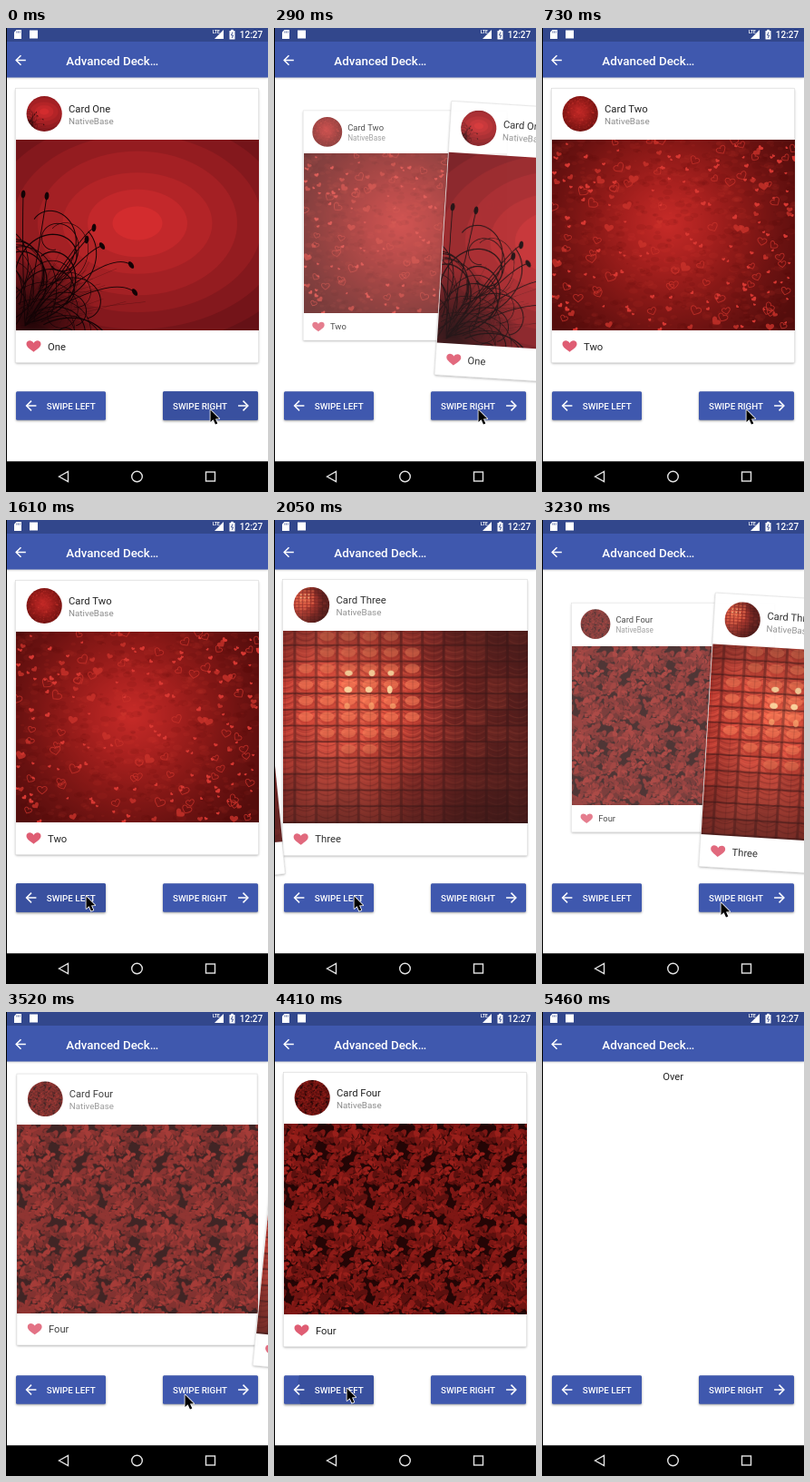
Animation of 289x511 px, one loop 6350 ms. Source, as an HTML page with a canvas:

```html
<!DOCTYPE html>
<html lang="en">
<head>
<meta charset="utf-8">
<title>Deck swiper</title>
<style>
html, body { margin: 0; width: 100%; height: 100%; overflow: hidden; background: #fff; }
canvas { display: block; width: 289px; height: 511px; }
</style>
</head>
<body>
<canvas id="stage"></canvas>
<script>
const W = 289, H = 511, LOOP = 6350;
const CARD = { x: 10.5, y: 66.5, w: 268, h: 302, cx: 144.5, cy: 217.5 };
const ART_W = 268, ART_H = 210, TAU = Math.PI * 2;
const BLUE = '#3f58ae';

const ratio = Math.max(1, window.devicePixelRatio || 1);
const stage = document.getElementById('stage');
stage.width = W * ratio;
stage.height = H * ratio;
const c = stage.getContext('2d');
c.imageSmoothingQuality = 'high';

function seeded(seed) {
  return () => {
    seed = (seed * 1664525 + 1013904223) >>> 0;
    return seed / 4294967296;
  };
}

function ellipse(g, x, y, rx, ry, fill, turn = 0) {
  g.fillStyle = fill;
  g.beginPath();
  g.ellipse(x, y, rx, ry, turn, 0, TAU);
  g.fill();
}

function box(g, x, y, w, h, fill, r = 0) {
  g.fillStyle = fill;
  g.beginPath();
  g.roundRect(x, y, w, h, r);
  g.fill();
}

function line(g, points, color, width, close) {
  g.strokeStyle = color;
  g.lineWidth = width;
  g.beginPath();
  points.forEach(([x, y]) => g.lineTo(x, y));
  if (close) g.closePath();
  g.stroke();
}

function blend(gradient, ...colors) {
  colors.forEach((color, i) => gradient.addColorStop(i / (colors.length - 1), color));
  return gradient;
}

function heartPath(g, w) {
  const u = w / 16;
  g.beginPath();
  g.moveTo(0, 6.3 * u);
  g.bezierCurveTo(-4 * u, 3.2 * u, -8 * u, 1 * u, -8 * u, -2.4 * u);
  g.bezierCurveTo(-8 * u, -7 * u, -2 * u, -7.4 * u, 0, -3.6 * u);
  g.bezierCurveTo(2 * u, -7.4 * u, 8 * u, -7 * u, 8 * u, -2.4 * u);
  g.bezierCurveTo(8 * u, 1 * u, 4 * u, 3.2 * u, 0, 6.3 * u);
  g.closePath();
}

function makeArt(paint) {
  const art = document.createElement('canvas');
  art.width = ART_W * 2;
  art.height = ART_H * 2;
  const g = art.getContext('2d');
  g.scale(2, 2);
  paint(g);
  return art;
}

// Concentric red bands with black flourishes growing from the lower left.
function paintSwirls(g) {
  const rnd = seeded(11), ink = '#130305';
  box(g, 0, 0, ART_W, ART_H, '#651116');
  for (let i = 7; i >= 1; i--) {
    const k = (7 - i) / 6;
    const shade = `rgb(${116 + 95 * k},${20 + 24 * k},${25 + 21 * k})`;
    ellipse(g, 134, 92, 27.5 * i, 18.6 * i + (i > 3 ? 5 : 0), shade);
  }
  g.lineCap = 'round';
  for (let i = 0; i < 30; i++) {
    let x = rnd() * 50 - 8, y = 205 - rnd() * 45, a = -0.1 - rnd() * 1.7;
    const side = rnd() < 0.5 ? -1 : 1, bend = 0.02 + rnd() * 0.03;
    const n = 55 + rnd() * 45, points = [];
    for (let s = 0; s < n; s++) {
      points.push([x, y]);
      x += Math.cos(a) * 1.7;
      y += Math.sin(a) * 1.7;
      a += side * bend * (1 + (s / 45) ** 2);
    }
    line(g, points, ink, 0.5 + rnd() * 0.9);
  }
  const buds = [[86, 97], [78, 110], [95, 117], [127, 138], [131, 168], [34, 62], [8, 60]];
  for (const [x, y] of buds) {
    g.strokeStyle = ink;
    g.lineWidth = 0.9;
    g.beginPath();
    g.moveTo(10, 205);
    g.quadraticCurveTo(x * 0.8, y + 70 - x * 0.7, x, y);
    g.stroke();
    ellipse(g, x, y, 2.4, 4.4, ink, x > 90 ? -0.6 : 0.1);
  }
  for (let i = 0; i < 30; i++) {
    const a = -rnd() * 1.5, r = 40 + rnd() * 60;
    const x = rnd() * 60, y = 205 - rnd() * 40;
    line(g, [[x, y], [x + Math.cos(a) * r, y + Math.sin(a) * r * 0.6]], ink + '55', 0.5);
  }
  box(g, 0, 0, ART_W, ART_H,
    blend(g.createRadialGradient(18, 196, 4, 18, 196, 70), ink + 'cc', ink + '00'));
}

function paintHearts(g) {
  const rnd = seeded(29);
  box(g, 0, 0, ART_W, ART_H, blend(g.createRadialGradient(128, 92, 5, 128, 92, 165),
    '#c42a27', '#a9211f', '#8a1917', '#6b1211', '#540d0c'));
  for (let i = 0; i < 900; i++) {
    const size = 1 + rnd() * 5;
    ellipse(g, rnd() * ART_W, rnd() * ART_H, size, size * 0.6, rnd() < 0.5 ? '#3d060614' : '#ff504010');
  }
  for (let i = 0; i < 330; i++) {
    const x = rnd() * ART_W, y = rnd() * ART_H;
    const far = Math.hypot((x - 130) / 130, (y - 95) / 105);
    const pick = rnd(), size = 3 + rnd() ** 2 * 9, turn = (rnd() - 0.5) * 1.6;
    if (pick > 0.2 + far * 0.65) continue;
    g.save();
    g.translate(x, y);
    g.rotate(turn);
    heartPath(g, size);
    g.fillStyle = g.strokeStyle = size > 6 ? '#c9322bcc' : '#d83832';
    g.lineWidth = 0.9;
    if (size > 7 && i % 4) g.stroke(); else g.fill();
    g.restore();
  }
}

// A lit wall of rippled glass bricks.
function paintGlass(g) {
  const rnd = seeded(5), cw = 23.3, ch = 17.6;
  box(g, 0, 0, ART_W, ART_H, blend(g.createLinearGradient(0, 0, ART_W, 0),
    '#b52a20', '#dd4333', '#e04434', '#c93426', '#96201a', '#661310', '#54100d', '#450b0a'));
  box(g, 0, 0, ART_W, ART_H, blend(g.createRadialGradient(85, 70, 5, 85, 70, 75),
    '#ff7a4c88', '#ff5a3c44', '#ff503000'));
  for (let i = 0; i < 12; i++) {
    for (let j = 0; j < 12; j++) {
      const x = i * cw - 10, y = j * ch - 2, mx = x + cw / 2, my = y + ch / 2;
      const near = Math.max(0, 1 - Math.hypot(mx - 85, my - 65) / 130);
      box(g, x, y, cw, ch, rnd() < 0.5 ? '#2003031c' : '#ff604010');
      for (let k = 0; k < 5; k++) {
        const sag = 2 + rnd() * 2.5, top = y + 2 + k * 3.4;
        g.strokeStyle = k % 2 ? `rgb(255 110 75 / ${0.1 + near * 0.4})` : '#4a07064d';
        g.lineWidth = 1.1;
        g.beginPath();
        g.moveTo(x + 1, top);
        g.quadraticCurveTo(mx, top + sag * 2, x + cw - 2, top);
        g.stroke();
      }
      if (near > 0.45) {
        ellipse(g, mx + 2, my + 3, cw * 0.36, ch * 0.36, '#b42a1c77');
        ellipse(g, mx, my - 1, cw * 0.34, ch * 0.3, '#ff7c5088');
      }
    }
  }
  for (let i = 0; i < 12; i++) {
    const x = (i + 1) * cw - 10;
    box(g, x - 2, 0, 3, ART_H, '#2a040466');
    box(g, x - cw / 2, 0, 1.2, ART_H, '#2a040426');
    box(g, 0, (i + 1) * ch - 3, ART_W, 1.8, '#2a040488');
  }
  for (let i = 0; i < 9; i++) {
    const x = 70 + (i % 3) * 23.3, y = 46 + Math.floor(i / 3) * 18;
    ellipse(g, x + rnd() * 4, y, 2.5 + rnd() * 2, 2 + rnd() * 2.5, i < 6 ? '#ffe0a0dd' : '#ffa868aa');
  }
  box(g, 0, 0, ART_W, ART_H, blend(g.createLinearGradient(0, 0, 0, ART_H),
    '#20030355', '#20030300', '#20030300', '#20030344', '#20030399'));
}

// Crowded petals that repeat as a wallpaper.
function paintPetals(g) {
  const rnd = seeded(77), tw = 89.5, th = 105;
  const gaps = [[47, 5], [0, 82], [68, 48]];
  const tones = ['#7f1714', '#8d1b17', '#701411', '#7a1613', '#981f1a', '#5c100e'];
  box(g, 0, 0, ART_W, ART_H, '#240505');
  for (let i = 0; i < 420; i++) {
    const x = rnd() * tw, y = rnd() * th, turn = rnd() * Math.PI;
    const size = 3 + rnd() * 4, tone = tones[Math.floor(rnd() * tones.length)];
    if (gaps.some(([gx, gy]) => Math.hypot((x - gx) / 11, (y - gy) / 8) < 0.7 + rnd() * 0.5)) continue;
    for (let px = x - tw; px < ART_W + tw; px += tw) {
      for (let py = y - th; py < ART_H + th; py += th) {
        ellipse(g, px, py, size, size * 0.55, tone, turn);
        ellipse(g, px + 2, py + 2.5, size * 0.5, 0.7, '#22040488', turn + 1);
      }
    }
  }
}

const cards = [
  ['One', paintSwirls], ['Two', paintHearts], ['Three', paintGlass], ['Four', paintPetals]
].map(([name, paint]) => ({ name, art: makeArt(paint) }));

function text(str, x, y, size, color, weight = 400, align = 'left') {
  c.font = `${weight} ${size}px Roboto, sans-serif`;
  c.textAlign = align;
  c.fillStyle = color;
  c.fillText(str, x, y);
}

function withShadow(color, blur, dy, paint) {
  c.save();
  c.shadowColor = color;
  c.shadowBlur = blur * ratio;
  c.shadowOffsetY = dy * ratio;
  paint();
  c.restore();
}

// The shadow stays outside the sheet, so a faded card remains white.
function drawSheet() {
  const { x, y, w, h } = CARD;
  c.save();
  c.beginPath();
  c.rect(x - 9, y - 9, w + 18, h + 18);
  c.rect(x, y, w, h);
  c.clip('evenodd');
  withShadow('#0005', 2.5, 1, () => box(c, x, y, w, h, '#fff', 1.5));
  c.restore();
  box(c, x, y, w, h, '#fff', 1.5);
  c.strokeStyle = '#dadada';
  c.lineWidth = 0.6;
  c.strokeRect(x, y, w, h);
}

function drawCard({ name, art }, { dx = 0, dy = 0, scale = 1, turn = 0, alpha = 1 }) {
  c.save();
  c.globalAlpha = alpha;
  c.translate(CARD.cx + dx, CARD.cy + dy);
  c.rotate(turn);
  c.scale(scale, scale);
  c.translate(-CARD.cx, -CARD.cy);
  drawSheet();
  c.drawImage(art, 11, 123, ART_W, ART_H);

  c.save();
  c.beginPath();
  c.arc(42.2, 94.5, 19.6, 0, TAU);
  c.clip();
  c.drawImage(art, 42.2 - 25, 74.9, 50, 39.2);
  c.restore();

  text('Card ' + name, 69, 92.5, 11.25, '#222');
  text('NativeBase', 69, 106, 9.84, '#8b8b8b');
  c.save();
  c.translate(30.5, 350.5);
  heartPath(c, 16);
  c.fillStyle = '#df5d73';
  c.fill();
  c.restore();
  text(name, 46, 354.5, 11.25, '#222');
  c.restore();
}

function arrow(x, y, r, dir, width) {
  const tip = x + dir * r;
  line(c, [[x - dir * r, y], [tip, y]], '#fff', width);
  line(c, [[tip - dir * r, y - r], [tip, y], [tip - dir * r, y + r]], '#fff', width);
}

const BUTTON_Y = 400.2, BUTTON_H = 31.6;
const buttons = {
  left: { x: 11, w: 99, label: 'SWIPE LEFT', textX: 44.7, arrowX: 28, dir: -1 },
  right: { x: 173, w: 105, label: 'SWIPE RIGHT', textX: 184, arrowX: 261.5, dir: 1 }
};
const presses = [
  { side: 'right', from: 0, to: 290, radius: 200 },
  { side: 'left', from: 1610, to: 1900, radius: 200 },
  { side: 'right', from: 2940, to: 3230, radius: 200 },
  { side: 'left', from: 4410, to: 4710, radius: 54 }
];

function drawButton(side, t, pointer) {
  const { x, w, label, textX, arrowX, dir } = buttons[side];
  const press = presses.find(p => p.side === side && t >= p.from && t < p.to);
  withShadow('#0006', 2.5, press ? 1.4 : 1, () => box(c, x, BUTTON_Y, w, BUTTON_H, BLUE, 1.5));
  if (press && pointer) {
    c.save();
    c.beginPath();
    c.roundRect(x, BUTTON_Y, w, BUTTON_H, 1.5);
    c.clip();
    ellipse(c, pointer[0], pointer[1], press.radius, press.radius, '#39509f');
    c.restore();
  }
  text(label, textX, 419.6, 9.84, '#fff', 500);
  arrow(arrowX, 416, 5.4, dir, 1.5);
}

function drawBars() {
  withShadow('#0005', 3, 1, () => box(c, 0, 0, W, 54.4, BLUE));
  box(c, 0, 0, W, 15, '#32478c');

  c.fillStyle = '#fff';
  c.beginPath();
  [[11.5, 2], [17, 2], [17, 12], [9, 12], [9, 4.5]].forEach(p => c.lineTo(...p));
  c.fill();
  [11.5, 13.2, 14.9].forEach(x => box(c, x, 3.4, 0.7, 2, '#32478c'));
  box(c, 26, 2.5, 9, 9, '#fff');
  text('LTE', 228, 6, 4.8, '#fff', 700);
  c.fillStyle = '#fff';
  c.beginPath();
  [[240, 2], [240, 12], [230, 12]].forEach(p => c.lineTo(...p));
  c.fill();
  box(c, 246.5, 3, 6, 9.5, '#fff', 0.6);
  box(c, 248.2, 1.8, 2.6, 1.5, '#fff');
  line(c, [[250, 4.5], [248.4, 8], [250.6, 8], [249.2, 11]], '#32478c', 0.9);
  text('12:27', 283.2, 11, 10, '#fff', 500, 'right');

  arrow(16.5, 35.5, 5.3, -1, 1.5);
  text('Advanced Deck…', 66.3, 40.5, 13.36, '#fff', 500);

  box(c, 0, 477.25, W, 34, '#000');
  line(c, [[58.5, 494], [68.5, 488.5], [68.5, 499.5]], '#e4e4e4', 1.4, true);
  c.beginPath();
  c.arc(144.5, 494, 5.8, 0, TAU);
  c.stroke();
  c.strokeRect(220.5, 489, 10, 10);
  box(c, 0, 0, 1, H, '#000');
}

const pointerPath = [
  [0, 225, 420], [870, 192, 421], [1010, 128, 417], [1160, 88, 414],
  [2190, 118, 417], [2340, 166, 420], [2490, 197, 421],
  [3670, 160, 419], [3820, 112, 416], [3960, 80, 414],
  [5310, 231, 490], [5460]
];

function drawPointer([x, y]) {
  c.save();
  c.translate(x, y);
  c.beginPath();
  [[0.5, 0.5], [0.5, 14], [3.6, 11.2], [6, 16.6], [8.3, 15.6], [6, 10.4], [10.2, 10.2]]
    .forEach(p => c.lineTo(...p));
  c.closePath();
  c.lineJoin = 'round';
  c.fillStyle = '#000';
  c.strokeStyle = '#fff';
  c.lineWidth = 1.6;
  c.stroke();
  c.fill();
  c.restore();
}

const swipes = [{ at: 241, dir: 1 }, { at: 1755, dir: -1 }, { at: 3183, dir: 1 }];
const SWIPE_MS = 380, OVER_AT = 4710, DP = W / 411;

// Damped spring from 0 to 1, with a slight overshoot.
function spring(ms) {
  const s = ms / 1000, damp = 11, freq = 10.45;
  return 1 - Math.exp(-damp * s) * (Math.cos(freq * s) + damp / freq * Math.sin(freq * s));
}

function drawDeck(t) {
  if (t >= OVER_AT) {
    text('Over', 144.7, 75, 11.25, '#222', 400, 'center');
    return;
  }
  const top = swipes.filter(s => t >= s.at + SWIPE_MS).length;
  const swipe = swipes[top];
  if (!swipe || t < swipe.at) {
    drawCard(cards[top], {});
    return;
  }
  const ms = t - swipe.at, p = Math.min(1, ms / 500);
  drawCard(cards[top + 1], {
    scale: 0.8 + 0.2 * spring(ms),
    alpha: 0.8 + 0.2 * p * p * (3 - 2 * p)
  });
  const glide = 400 * (1 - Math.exp(-0.02 * ms));
  drawCard(cards[top], {
    dx: swipe.dir * glide * DP,
    dy: glide / 8 * DP,
    turn: swipe.dir * glide / 70 * Math.PI / 180,
    alpha: 1 - 0.1 * Math.min(1, glide / 320)
  });
}

// The picture is held between these moments.
const ticks = [
  0, 290, 440, 580, 730, 870, 1010, 1160, 1610, 1900, 2050, 2190, 2340, 2490,
  2790, 2940, 3230, 3380, 3530, 3670, 3820, 3960, 4410, 4710, 5310, 5460
];

function draw(time) {
  const t = ticks.findLast(tick => tick <= time);
  const spot = pointerPath.findLast(([at]) => at <= t).slice(1);
  const pointer = spot.length ? spot : null;
  c.setTransform(ratio, 0, 0, ratio, 0, 0);
  box(c, 0, 0, W, H, '#fff');
  drawDeck(t);
  drawButton('left', t, pointer);
  drawButton('right', t, pointer);
  drawBars();
  if (pointer) drawPointer(pointer);
}

const start = performance.now();
function play() {
  draw((performance.now() - start) % LOOP);
  requestAnimationFrame(play);
}
play();
</script>
</body>
</html>
```
